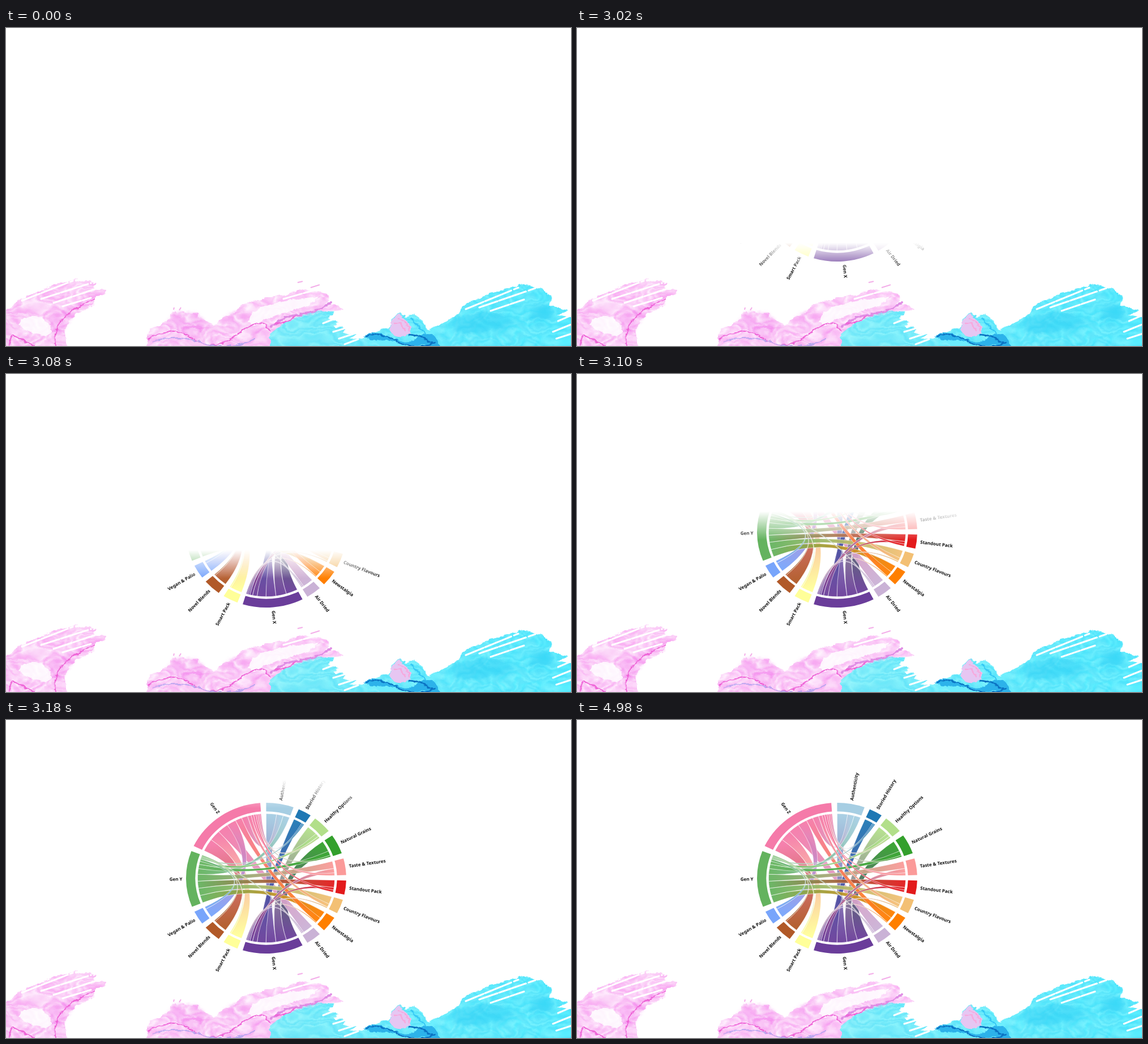
Animation of 998 by 561 pixels, one loop 6.16 s. Source, as an HTML page:

```html
<!DOCTYPE html>
<html lang="en">
<head>
<meta charset="utf-8">
<title>Chord diagram reveal</title>
<style>
  html, body { margin: 0; width: 100%; height: 100%; overflow: hidden; background: #fff; }
  svg { position: absolute; left: 0; top: 0; width: 998px; height: 561px; }
  text { font: 600 8px "Noto Sans", "Open Sans", sans-serif; fill: #111; }
</style>
</head>
<body>
<svg id="paint" viewBox="0 0 998 561">
  <defs>
    <linearGradient id="aqua" gradientUnits="userSpaceOnUse" x1="467" x2="998">
      <stop offset="0" stop-color="#8df3fb"/>
      <stop offset=".35" stop-color="#70f0fd"/>
      <stop offset="1" stop-color="#58efff"/>
    </linearGradient>
    <filter id="rough" filterUnits="userSpaceOnUse" x="-10" y="425" width="1020" height="160" color-interpolation-filters="sRGB">
      <feTurbulence type="fractalNoise" baseFrequency=".08 .12" numOctaves="3" seed="8"/>
      <feDisplacementMap in="SourceGraphic" scale="8" xChannelSelector="R" yChannelSelector="G"/>
    </filter>
    <filter id="soft" x="-20%" y="-20%" width="140%" height="140%">
      <feGaussianBlur stdDeviation="3"/>
    </filter>
    <path id="pinkLeft" d="M-9 502L14 489 20 481 62 463 100 449 128 441 122 447 148 446 160 450 155 456 161 462 176 463 174 469 160 473 155 488 134 500 114 511 105 530 107 580H-9Z"/>
    <path id="pinkMid" d="M249 580V540L256 530 270 526 286 515 292 504 300 500 306 506 313 499 322 504 336 502 342 512 358 517 366 526 384 510 408 500 416 488 440 482 470 473 500 469 528 461 545 464 568 469 573 478 566 486 588 490 596 497 560 502 520 510 490 522 467 540V580Z"/>
    <path id="cyan" d="M467 580V538L490 522 518 508 545 499 580 501 570 512 586 520 580 527 602 529 594 538 618 541 608 549 632 547 655 533 676 530 681 514 694 503 706 509 722 505 738 520 746 534 766 524 800 504 806 490 850 470 914 452 948 462 964 474 960 490 994 498 974 506 1010 512V580Z"/>
  </defs>
  <g filter="url(#rough)">
    <g fill="#fcc6f8">
      <use href="#pinkLeft"/>
      <use href="#pinkMid"/>
    </g>
    <path fill="#f48ff0" opacity=".75" filter="url(#soft)" d="M283 522L300 502 335 504 362 530Q320 550 283 522ZM385 514Q410 490 424 514T466 528Q420 552 385 514ZM70 530Q90 490 150 478 110 500 96 545Z"/>
    <use href="#cyan" fill="url(#aqua)"/>
    <g id="veins"></g>
    <path fill="#fff" opacity=".85" d="M428 520Q425 498 470 487T552 474Q540 490 500 500T438 526ZM22 522Q40 500 62 512T78 540Q50 548 22 522Z"/>
    <g fill="none" stroke-linecap="round">
      <path stroke="#df8de4" stroke-width="4" d="M470 526Q488 510 520 505T574 484"/>
      <path stroke="#ee63d6" stroke-width="2" d="M4 560L12 541 50 561M88 561Q80 530 110 505T158 478M252 550Q290 522 330 548T410 540T466 533M475 520Q492 526 512 508"/>
      <path stroke="#b9a6f0" stroke-width="2" d="M260 553Q300 538 345 555T440 548"/>
    </g>
    <path fill="#2cb2ea" d="M632 545Q650 529 680 545T730 544T768 561V570H672Q656 549 632 545Z"/>
    <path fill="#6cecfc" d="M650 553Q680 548 700 556T742 557L730 567H670Z"/>
    <path fill="#e6c6f2" d="M679 518L694 504 704 512Q718 526 714 538 700 548 686 542 676 530 679 518Z"/>
    <g fill="none" stroke-width="2.5" stroke-linecap="round">
      <path stroke="#0b72c2" d="M636 544Q665 534 690 552T758 556M712 541Q735 542 752 556"/>
      <path stroke="#f7a8dd" d="M686 520Q700 520 704 534M694 512Q712 520 712 534"/>
      <path stroke="#36c8f4" d="M716 512Q728 528 744 540"/>
    </g>
    <path fill="#26cbf3" opacity=".45" filter="url(#soft)" d="M925 492Q960 480 968 500T925 514ZM795 512Q830 494 880 508T850 535 795 512Z"/>
  </g>
  <path stroke="#fff" stroke-width="3" stroke-linecap="round" stroke-dasharray="34 3 50 5" d="M28 481L118 446M62 478L150 450M84 485L165 458M100 491L150 476M812 496L905 458M836 493L935 459M856 499L915 479M975 517L1003 505M966 536L1003 521M972 548L1003 538M560 521L590 509M578 536L622 523M588 548L634 533M598 558L622 549M490 478L560 458"/>
  <path stroke="#f3aee9" stroke-width="2" d="M515 449L524 447M538 458L554 453M296 497L297 493M306 498L309 493"/>
</svg>
<svg id="chart" viewBox="0 0 998 561"><defs id="gradients"></defs></svg>
<script>
const LOOP = 6160, WIPE_START = 3020, WIPE_STEP = 40, WIPE_STEPS = 5;
const CX = 459.5, CY = 279, RX = 141.5, RY = 133;
const RING = 0.885, RIBBON = 0.856;

// name, colour, start and end in degrees clockwise from the top, links to Gen Z, Gen Y and Gen X
const groups = [
  ["Authenticity", "#a6cee3", 0, 20, [5.3, 5.2, 8.3]],
  ["Storied History", "#1f78b4", 24, 33.7, [1.2, 1, 7.4]],
  ["Healthy Options", "#b2df8a", 37.7, 51.3, [1.7, 3, 8.8]],
  ["Natural Grains", "#33a02c", 55.5, 70.7, [1.5, 4, 9.8]],
  ["Taste & Textures", "#fb9a99", 74.8, 87.6, [2.2, 6.4, 3.8]],
  ["Standout Pack", "#e31a1c", 91.8, 102.6, [2, 6.6, 2.3]],
  ["Country Flavours", "#f3c074", 106.7, 117.7, [3, 6.8, 1.1]],
  ["Newstalgia", "#ff7f00", 121.7, 133.7, [5.6, 7, 0.8]],
  ["Air Dried", "#cab2d6", 138, 149, [9.4, 1, 1.3]],
  ["Gen X", "#6a3d9a", 153, 197],
  ["Smart Pack", "#ffff99", 201, 212, [9.6, 1, 0]],
  ["Novel Blends", "#b15928", 216.3, 229, [11.5, 1, 0]],
  ["Vegan & Palio", "#78a5fb", 233, 243.5, [8, 2, 0]],
  ["Gen Y", "#64b35f", 247.7, 291],
  ["Gen Z", "#f57aa9", 295.2, 355.8],
].map(([name, color, start, end, links]) => ({ name, color, start, end, links, slots: [] }));
const generations = ["Gen Z", "Gen Y", "Gen X"].map(name => groups.find(g => g.name === name));

const chart = document.getElementById("chart");
const gradients = document.getElementById("gradients");

function add(parent, tag, attributes, text) {
  const node = document.createElementNS("http://www.w3.org/2000/svg", tag);
  for (const key in attributes) node.setAttribute(key, attributes[key]);
  if (text) node.textContent = text;
  return parent.appendChild(node);
}

function point(degrees, scale) {
  const a = degrees * Math.PI / 180;
  return [CX + RX * scale * Math.sin(a), CY - RY * scale * Math.cos(a)];
}

const arcTo = (degrees, scale, sweep) =>
  `A${RX * scale} ${RY * scale} 0 0 ${sweep} ${point(degrees, scale)}`;

// Marbled veins: contour bands of smooth noise, clipped to a shape
function addVeins(shape, rgb, seed, bands) {
  const id = `vein${shape}${seed}`;
  const veins = document.getElementById("veins");
  const filter = add(veins, "filter", {
    id, filterUnits: "userSpaceOnUse", x: -10, y: 425, width: 1020, height: 160,
    "color-interpolation-filters": "sRGB",
  });
  add(filter, "feTurbulence", { type: "fractalNoise", baseFrequency: ".014 .022", numOctaves: 2, seed });
  add(filter, "feColorMatrix", {
    values: rgb.map(c => `0 0 0 0 ${c}`).join(" ") + " 0 0 0 1 0",
  });
  const transfer = add(filter, "feComponentTransfer", {});
  add(transfer, "feFuncA", { type: "table", tableValues: bands });
  add(filter, "feComposite", { operator: "in", in2: "SourceGraphic" });
  add(veins, "use", { href: "#" + shape, filter: `url(#${id})` });
}

const whiteBands = "0 0 0 0 0 .3 .8 .2 .6 0 .5 .8 .3 .6 0 .6 .8 0 0 0 0";
const colorBands = "0 0 0 0 0 .3 0 .3 .1 .3 0 .2 .3 0 .3 .1 .4 0 0 0 0";
for (const shape of ["pinkLeft", "pinkMid"]) {
  addVeins(shape, [1, 1, 1], 3, whiteBands);
  addVeins(shape, [0.95, 0.45, 0.9], 11, colorBands);
}
addVeins("cyan", [0.72, 0.98, 1], 5, colorBands);
addVeins("cyan", [0.12, 0.78, 0.95], 14, colorBands);

// Each link takes a slot on both of its groups; slots run from wide to narrow
const ribbons = [];
for (const group of groups) {
  (group.links || []).forEach((value, i) => {
    if (!value) return;
    const ends = [group, generations[i]].map(owner => {
      const slot = { value, color: owner.color };
      owner.slots.push(slot);
      return slot;
    });
    ribbons.push(ends);
  });
}
for (const { start, end, slots } of groups) {
  const total = slots.reduce((sum, slot) => sum + slot.value, 0);
  let angle = start;
  for (const slot of slots.sort((a, b) => b.value - a.value)) {
    slot.from = angle;
    slot.to = angle += (end - start) * slot.value / total;
  }
}

// Wide ribbons lie below narrow ones
ribbons.sort(([a], [b]) => b.value - a.value);
ribbons.forEach(([a, b], i) => {
  const [[x1, y1], [x2, y2]] = [a, b].map(s => point((s.from + s.to) / 2, RIBBON));
  const gradient = add(gradients, "linearGradient", {
    id: "blend" + i, gradientUnits: "userSpaceOnUse", x1, y1, x2, y2,
  });
  add(gradient, "stop", { offset: 0, "stop-color": a.color });
  add(gradient, "stop", { offset: 1, "stop-color": b.color });
  const bend = degrees => `Q${CX} ${CY} ${point(degrees, RIBBON)}`;
  add(chart, "path", {
    d: `M${point(a.from, RIBBON)}${arcTo(a.to, RIBBON, 1)}${bend(b.from)}` +
       `${arcTo(b.to, RIBBON, 1)}${bend(a.from)}Z`,
    fill: `url(#blend${i})`, "fill-opacity": 0.95,
    stroke: "#fff", "stroke-width": 0.7, "stroke-opacity": 0.8,
  });
});

for (const { name, color, start, end } of groups) {
  add(chart, "path", {
    d: `M${point(start, 1)}${arcTo(end, 1, 1)}L${point(end, RING)}${arcTo(start, RING, 0)}Z`,
    fill: color,
  });
  const middle = (start + end) / 2;
  const [x, y] = point(middle, 1.046);
  const flipped = middle > 180;
  const turn = Math.atan2(y - CY, x - CX) * 180 / Math.PI + (flipped ? 180 : 0);
  add(chart, "text", {
    transform: `translate(${x} ${y}) rotate(${turn})`,
    y: 2.9, "text-anchor": flipped ? "end" : "start",
  }, name);
}

// Soft-edged wipe from the bottom up, in equal steps
function draw(now) {
  const elapsed = now % LOOP - WIPE_START;
  const step = Math.min(WIPE_STEPS, Math.floor(elapsed / WIPE_STEP));
  const edge = 379 - 68.3 * step;
  const mask = step < WIPE_STEPS
    ? `linear-gradient(transparent ${edge}px, #000 ${edge + 50}px)` : "none";
  chart.style.visibility = elapsed < 0 ? "hidden" : "visible";
  chart.style.webkitMaskImage = chart.style.maskImage = mask;
  requestAnimationFrame(draw);
}
draw(performance.now());
</script>
</body>
</html>
```
